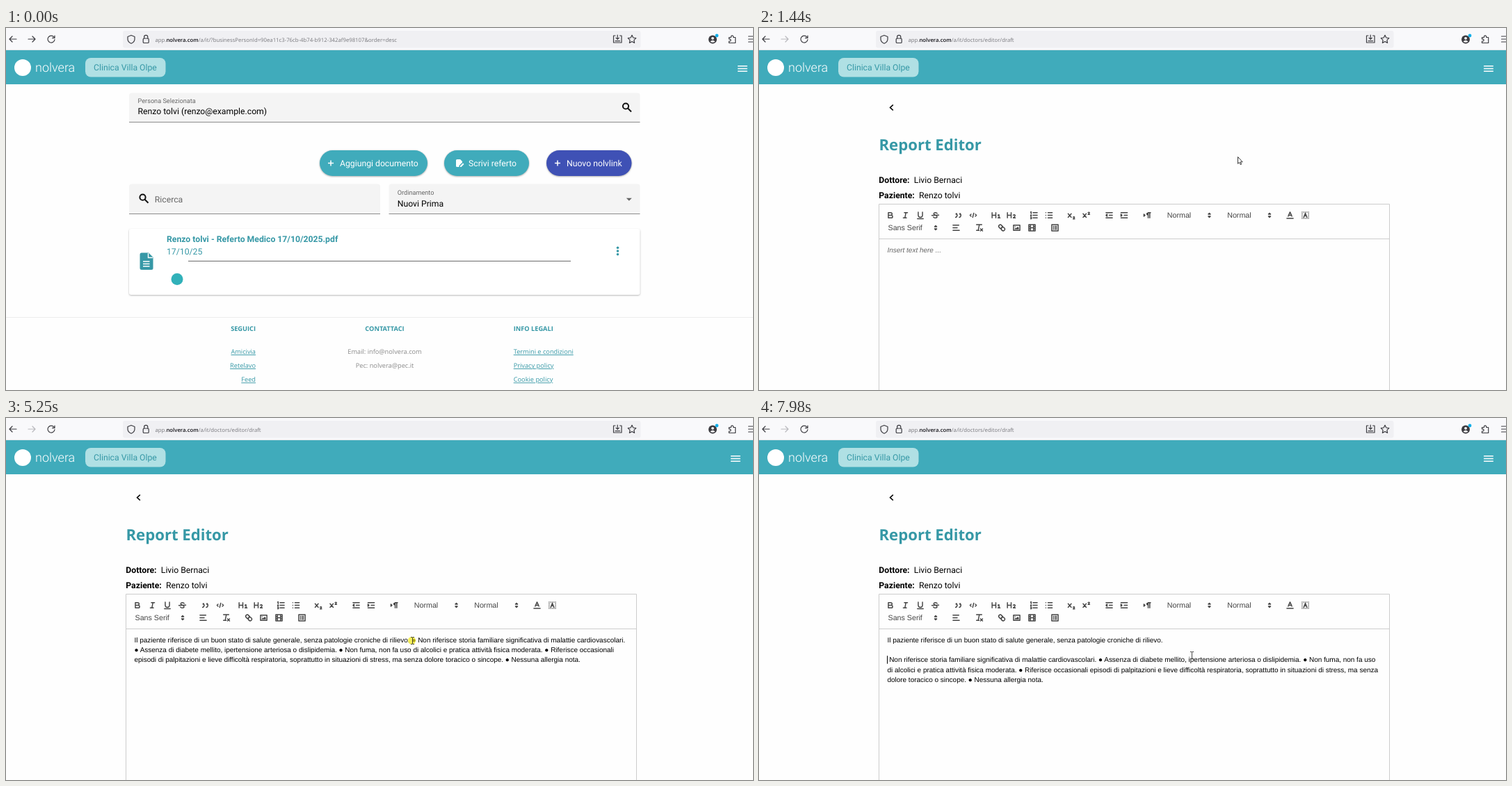
These frames come from a looping animation (1074x521 px, 8 s). An HTML page:

```html
<!DOCTYPE html>
<html lang="it">
<head>
<meta charset="utf-8">
<title>Report Editor</title>
<style>
html, body { margin: 0; width: 100%; height: 100%; overflow: hidden; background: #fefefe; }
svg { display: block; width: 100vw; height: 100vh; }
text { font: 12.23px Roboto, sans-serif; white-space: pre; text-rendering: geometricPrecision; }
.line { fill: none; stroke: #3b3b40; stroke-width: 1.2; stroke-linecap: round; stroke-linejoin: round; }
.url { font: 7.77px "Open Sans", sans-serif; fill: #77777c; }
.host { fill: #15141a; font-weight: 600; }
.label { font-size: 9.17px; fill: #666; }
.teal { fill: #3698a6; }
.white { fill: #fff; }
.bold { font-weight: 700; }
.field { fill: #f4f4f4; }
.rule { stroke: #8c8c8c; }
.find { fill: none; stroke: #111; stroke-width: 2; }
.foot text { font: 9.22px "Open Sans", sans-serif; fill: #3698a6; }
.foot .bold { font-weight: 700; }
.foot .link { text-decoration: underline; }
.foot .grey { fill: #8a8a8a; }
.end { text-anchor: end; }
.mid { text-anchor: middle; }
.raised { filter: drop-shadow(0 1.2px .8px rgba(0,0,0,.25)) drop-shadow(0 .6px 1.2px rgba(0,0,0,.12)); }
.raised.up { filter: drop-shadow(0 2.5px 2px rgba(0,0,0,.35)) drop-shadow(0 1px 2.5px rgba(0,0,0,.15)); }
.card { filter: drop-shadow(0 1px .8px rgba(0,0,0,.28)); }
.title { font: 700 22.15px "Open Sans", sans-serif; fill: #3698a6; }
.pick { font: 10.7px "Liberation Sans", Arial, sans-serif; fill: #444; }
.body { font: 9.97px "Liberation Sans", Arial, sans-serif; }
.hint { font-style: italic; fill: #666; }
.icon { fill: none; stroke: #444; stroke-width: 1.9; stroke-linecap: round; stroke-linejoin: round; }
</style>
</head>
<body>
<svg id="stage" viewBox="0 0 1074 521">
  <defs>
    <clipPath id="pill"><rect x="630" y="176" width="122" height="37" rx="18.5"/></clipPath>
  </defs>
  <rect width="1074" height="521" fill="#fefefe"/>

  <!-- browser bar -->
  <rect width="1074" height="32" fill="#f9f9fb"/>
  <rect y="31" width="1074" height="1" fill="#e2e8ea"/>
  <rect x="168" y="4" width="744.5" height="24.5" rx="3" fill="#f0f0f3"/>
  <g class="line">
    <path d="M15 16H5M9 12l-4 4 4 4"/>
    <path id="forward" d="M32 16H42M38 12l4 4-4 4"/>
    <path d="M69 13A5 5 0 1 0 70 16.5M70 11v3.3h-3.5"/>
    <path d="M180 10.5l5 2v3.5c0 3-2 5-5 6.3c-3-1.3-5-3.3-5-6.3v-3.5z"/>
    <rect x="197.2" y="15" width="8" height="6.5" rx="1.3"/>
    <path d="M198.6 15v-2a2.6 2.6 0 0 1 5.2 0v2"/>
    <path d="M876 11h-2.5v10h11.5v-10h-2.5M879.2 10v6M877 14.2l2.2 2.2 2.2-2.2M876 18.7h6.5"/>
    <path d="M900 10.3l1.8 3.7 4 .6-2.9 2.8.7 4-3.6-1.9-3.6 1.9.7-4-2.9-2.8 4-.6z"/>
    <path d="M1039.5 13.5h3v-1a1.6 1.6 0 0 1 3.2 0v1h3v8h-9.2v-2.5h1a1.6 1.6 0 0 0 0-3.2h-1z"/>
    <path d="M1067.5 12h9M1067.5 16h9M1067.5 20h9"/>
  </g>
  <circle cx="1016" cy="16.5" r="6" fill="#3b3b40"/>
  <circle cx="1016" cy="14.8" r="1.9" class="white"/>
  <path d="M1012.5 19.5q3.5-3.5 7 0q-3.5 2.5-7 0z" class="white"/>
  <circle cx="1022" cy="11" r="2.4" fill="#12aee8"/>
  <text class="url" x="214.5" y="19.6">app.<tspan class="host">nolvera.com</tspan><tspan id="path"></tspan></text>

  <!-- site header -->
  <rect y="32" width="1074" height="49" fill="#40abbb"/>
  <circle cx="24" cy="57" r="12" class="white"/>
  <text x="42" y="63" class="white" style="font-size:18px;font-weight:300">nolvera</text>
  <rect x="114" y="43" width="115.5" height="27.5" rx="8" fill="#b0e0e4"/>
  <text x="126" y="61.3" class="teal">Clinica Villa Olpe</text>
  <path id="menu" d="M1052 54.7h13.8M1052 58.5h13.8M1052 62.3h13.8" stroke="#fff" stroke-width="1.6"/>

  <!-- document list -->
  <g id="list">
    <path class="field" d="M177 135V97q0-3.5 3.5-3.5H908q3.5 0 3.5 3.5v38z"/>
    <path class="rule" d="M177 135.5H911.5"/>
    <text x="189.5" y="108.3" class="label">Persona Selezionata</text>
    <text x="189.5" y="123.8">Renzo tolvi (renzo@example.com)</text>
    <g class="find"><circle cx="891" cy="112.5" r="4.1"/><path d="M894 115.5l5 5"/></g>

    <rect class="raised" x="451" y="176" width="155" height="37" rx="18.5" fill="#40abbb"/>
    <path d="M463 194.5h8M467 190.5v8" stroke="#fff" stroke-width="1.5"/>
    <text x="480" y="199" class="white">Aggiungi documento</text>
    <rect id="write" class="raised" x="630" y="176" width="122" height="37" rx="18.5" fill="#40abbb"/>
    <g clip-path="url(#pill)">
      <rect id="glow" x="630" y="176" width="122" height="37" fill="#fff" opacity=".08"/>
      <circle id="ripple" cx="689" cy="187" fill="#fff" opacity=".13"/>
    </g>
    <path d="M648.5 189h4.5l3 3v1.5l-4.5 4.5v2h-3q-1.5 0-1.5-1.5v-8q0-1.5 1.5-1.5zM653 198.5l4-4 1.5 1.5-4 4H653z" class="white"/>
    <text x="665" y="199" class="white">Scrivi referto</text>
    <rect class="raised" x="777" y="176" width="122.5" height="37" rx="18.5" fill="#3f51b5"/>
    <path d="M789 194.5h8M793 190.5v8" stroke="#fff" stroke-width="1.5"/>
    <text x="806" y="199" class="white">Nuovo nolvlink</text>

    <path class="field" d="M177 267V228q0-3.5 3.5-3.5H534.5q3.5 0 3.5 3.5v39z"/>
    <path id="order" class="field" d="M550.5 267V228q0-3.5 3.5-3.5H908q3.5 0 3.5 3.5v39z"/>
    <path class="rule" d="M177 267.5H538M550.5 267.5H911.5"/>
    <g class="find"><circle cx="196.5" cy="243.7" r="4.1"/><path d="M199.5 246.7l5 5"/></g>
    <text x="213.8" y="250.9" fill="#666">Ricerca</text>
    <text x="562.7" y="240" class="label">Ordinamento</text>
    <text x="562.7" y="256.8">Nuovi Prima</text>
    <path d="M891.8 244.8h8l-4 4z" fill="#666"/>

    <rect class="card white" x="177" y="289" width="734.5" height="95" rx="3"/>
    <path class="teal" d="M195 323.5h10l6.5 6.5v15.5a2.5 2.5 0 0 1-2.5 2.5h-14a2.5 2.5 0 0 1-2.5-2.5v-19.5a2.5 2.5 0 0 1 2.5-2.5z"/>
    <path d="M204.5 324v6.5h6.5M197 336h9.5M197 339.5h9.5M197 343h9.5" fill="none" stroke="#fff" stroke-width="1.4"/>
    <text x="231" y="308.2" class="teal bold">Renzo tolvi - Referto Medico 17/10/2025.pdf</text>
    <text x="231" y="326" class="teal">17/10/25</text>
    <path d="M262 335.5H812" stroke="#6c6c6c"/>
    <circle cx="246" cy="361.5" r="8.5" fill="#31b1b9"/>
    <g class="teal"><circle cx="879.5" cy="316.3" r="1.8"/><circle cx="879.5" cy="321" r="1.8"/><circle cx="879.5" cy="325.7" r="1.8"/></g>

    <path d="M0 416.5H1074" stroke="#ececec"/>
    <g class="foot">
      <text x="359" y="435.6" class="bold end">SEGUICI</text>
      <text x="359" y="469" class="link end">Amicivia</text>
      <text x="359" y="489" class="link end">Retelavo</text>
      <text x="359" y="509.3" class="link end">Feed</text>
      <text x="544.5" y="435.6" class="bold mid">CONTATTACI</text>
      <text x="544.5" y="469" class="grey mid">Email: info@nolvera.com</text>
      <text x="544.5" y="489" class="grey mid">Pec: nolvera@pec.it</text>
      <text x="729.7" y="435.6" class="bold">INFO LEGALI</text>
      <text x="729.7" y="469" class="link">Termini e condizioni</text>
      <text x="729.7" y="489" class="link">Privacy policy</text>
      <text x="729.7" y="509.3" class="link">Cookie policy</text>
    </g>
  </g>

  <!-- report editor -->
  <g id="editor">
    <path d="M192.8 110.5l-4.2 4 4.2 4" fill="none" stroke="#000" stroke-width="1.7"/>
    <text x="172.5" y="176" class="title">Report Editor</text>
    <text x="172.3" y="223.4" class="bold">Dottore:</text><text x="222.8" y="223.4">Livio Bernaci</text>
    <text x="172.3" y="244.5" class="bold">Paziente:</text><text x="230" y="244.5">Renzo tolvi</text>
    <path d="M172.5 530V253.5H906.5V530M172.5 303.5H906.5" fill="none" stroke="#ccc"/>
    <text x="586.8" y="273.3" class="pick">Normal</text>
    <text x="673.2" y="273.3" class="pick">Normal</text>
    <text x="185.5" y="291.3" class="pick">Sans Serif</text>
    <g id="tools"></g>
    <g id="lines"></g>
    <circle id="click" cx="583.5" cy="320.3" r="5.6" fill="#f3ea1e" opacity=".72"/>
    <rect id="caret" width="1" height="11.5"/>
  </g>

  <g id="cursor">
    <path id="arrow" d="M0 0v9.8l2.2-2 1.5 3.3 1.5-.6-1.5-3.2h3z" fill="#fff" stroke="#222" stroke-width=".9"/>
    <path id="hand" d="M-1.1 7V1.1a1.1 1.1 0 0 1 2.2 0v3.9l3 .7q1.4.4 1.2 2l-.5 3.3-1 2.5h-4.6l-3-4.4q-.7-1.4.5-1.7z" fill="#fff" stroke="#222" stroke-width=".9"/>
    <path id="beam" d="M-2.5-5h2l.5.5.5-.5h2M0-4.5v9M-2.5 5h2l.5-.5.5.5h2" fill="none" stroke="#333" stroke-width=".9"/>
  </g>
</svg>
<script>
const $ = id => document.getElementById(id);
const show = (id, on) => $(id).setAttribute('display', on ? 'inline' : 'none');
const within = (t, a, b) => t >= a && t < b;
const latest = (rows, t) => rows.filter(r => t >= r[0]).pop() || rows[0];

// Toolbar glyphs on an 18-unit grid: [centre x, centre y, path, solid path]
const UPDOWN = 'M7 11l2 2 2-2zM7 7l2-2 2 2z';
const TWO = 'q1.5-1.5 2.6 0q.4 1-2.6 3.5h3';
const tools = [
  [189, 269.5, 'M5 4h4.5a2.5 2.5 0 0 1 0 5H5zM5 9h5.5a2.5 2.5 0 0 1 0 5H5z'],
  [210.5, 269.5, 'M7 4h6M5 14h6M8 14l2-10'],
  [232, 269.5, 'M5 3v6a4 4 0 0 0 8 0V3M3.5 15.5h11'],
  [253.5, 269.5, 'M12.5 5.5C11 3.3 6 3.5 6 6.3c0 2.8 6.3 2.2 6.3 5.3c0 3-5 3.2-6.8.8M2.5 9.3l13-.6'],
  [286.5, 269.5, 'M7 8c0 4-3 5-3 5M14 8c0 4-3 5-3 5', 'M4 5h3v3H4zM11 5h3v3h-3z'],
  [308, 269.5, 'M5 7L3 9l2 2M13 7l2 2-2 2M10 5L8 13'],
  [340.5, 269.5, 'M2 4v10M9 4v10M2 9h7M13 9l2-1v6M13 14h4'],
  [362.5, 269.5, 'M2 4v10M9 4v10M2 9h7M13 9q2-2 3.5 0q.4 1.5-3.5 5h4'],
  [395.5, 269.5, 'M7 4h8M7 9h8M7 14h8M2.5 3l1-.5V6M2.5 8.5h1.5l-1.5 2h1.5M2.5 13h1.5v2.5H2.5'],
  [417, 269.5, 'M7 4h8M7 9h8M7 14h8M3 4h0M3 9h0M3 14h0'],
  [449, 269.5, 'M3 6l6 7M9 6l-6 7M12.5 12.5' + TWO],
  [470.5, 269.5, 'M3 6l6 7M9 6l-6 7M12.5 4' + TWO],
  [503.5, 269.5, 'M3 14h12M3 4h12M9 9h6M5 7v4L3 9z'],
  [525, 269.5, 'M3 14h12M3 4h12M9 9h6M3 7v4l2-2z'],
  [558, 269.5, 'M3 7v4l2-2zM15.5 4H11M11 4v10M14 4v10', 'M11 9H10a2.5 2.5 0 0 1 0-5h1z'],
  [647.5, 269.5, UPDOWN], [734, 269.5, UPDOWN],
  [763.5, 269.5, 'M3 15h12M5.5 11L9 3l3.5 8M11.6 9H6.4'],
  [785.5, 269.5, 'M6 13l3-8 3 8M11 10H7M3 3h0M6 3h0M9 3h0M12 3h0M15 3h0M3 6h0M15 6h0M3 9h0M15 9h0M3 12h0M15 12h0M3 15h0M6 15h0M9 15h0M12 15h0M15 15h0'],
  [254, 287.5, UPDOWN],
  [283.5, 287.5, 'M3 4h11M3 9h8M3 14h12'],
  [316.5, 287.5, 'M4 3h10M9.5 3L7.5 12M4 14h5M11.5 11l4 4M15.5 11l-4 4'],
  [349, 287.5, 'M7 11l4-4M8.9 4.6a3.5 3.5 0 0 1 .4 4.7a3.5 3.5 0 0 1-4.7-.4c-1.4-1.4-2.5-2.5-.4-4.7s3.3-1 4.7.4zM13.4 9.1a3.5 3.5 0 0 0-4.7-.4a3.5 3.5 0 0 0 .4 4.7c1.4 1.4 2.5 2.5 4.7.4s1-3.3-.4-4.7z'],
  [370.5, 287.5, 'M3 4h12v10H3zM6 7h0', 'M5 12v-1l2-2 1 1 3-3 2 2v3z'],
  [392.5, 287.5, 'M3 3h12v12H3zM6 3v12M12 3v12M6 9h6M3 7h3M3 11h3M12 7h3M12 11h3'],
  [425.5, 287.5, 'M3 3h12v12H3zM6 6.5h1M9.5 6.5H12M6 9h1M9.5 9H12M6 11.5h1M9.5 11.5H12']
];
$('tools').innerHTML = tools.map(([x, y, d, solid]) =>
  `<g transform="translate(${x - 6.88} ${y - 6.88}) scale(.7645)"><path class="icon" d="${d}"/>` +
  (solid ? `<path fill="#444" d="${solid}"/>` : '') + '</g>').join('');

// Report text, cut where the lines may break
const intro = 'Il paziente riferisce di un buon stato di salute generale, senza patologie croniche di rilievo.';
const family = ' Non riferisce storia familiare significativa di malattie cardiovascolari.';
const illness = '● Assenza di diabete mellito, ipertensione arteriosa o dislipidemia.';
const habits = '● Non fuma, non fa uso';
const sport = 'di alcolici e pratica attività fisica moderata.';
const reports = '● Riferisce occasionali';
const episodes = 'episodi di palpitazioni e lieve difficoltà respiratoria, soprattutto in situazioni di stress, ma senza';
const ending = 'dolore toracico o sincope. ● Nessuna allergia nota.';
const tail = [[sport, reports, episodes].join(' '), ending];
const second = [family, illness, habits].join(' ');
const texts = [
  [1370, ['Insert text here ...']],
  [3390, [`${intro} ●${family}`, [illness, habits, sport, reports].join(' '), `${episodes} ${ending}`]],
  [6120, [intro, '●' + second, ...tail]],
  [6650, [intro, second, ...tail]],
  [7980, [intro, '', second, ...tail]]
];
const LEADING = 14.1;
let shown = null;
function setText(t) {
  const now = latest(texts, t);
  if (now === shown) return;
  shown = now;
  const look = now === texts[0] ? 'body hint' : 'body';
  $('lines').innerHTML = now[1].map((s, i) =>
    `<text class="${look}" x="184.4" y="${323.2 + i * LEADING}">${s}</text>`).join('');
}

// Caret: from, to, x, line
const carets = [
  [2330, 2860, 184, 0], [3390, 3940, 824, 2], [4470, 5000, 824, 2], [5380, 5920, 582, 0],
  [6120, 7180, 184, 1], [7710, 7980, 184, 1], [7980, 8000, 184, 2]
];

// Pointer moves: start, steps, from, bend, to
const moves = [
  [190, 12, [983, 494], [850, 300], [688.5, 185.5]],
  [1710, 10, [688.5, 185.5], [530, 280], [371.5, 375.5]],
  [3940, 11, [371.5, 375.5], [430, 415], [612.5, 335.5]],
  [4770, 7, [612.5, 335.5], [598, 328], [584.5, 320.5]],
  [5380, 3, [584.5, 320.5], [604, 331], [622.5, 341.5]]
];
const STEP = 69;
const ease = p => p * p * (3 - 2 * p);
function pointer(t) {
  const [start, steps, a, b, c] = latest(moves, t);
  const step = Math.max(0, Math.floor((t - start) / STEP) + 1);
  const p = ease(Math.min(1, step / steps)), q = 1 - p;
  return a.map((v, i) => q * q * v + 2 * q * p * b[i] + p * p * c[i]);
}

function draw(t) {
  const list = t < 1370;
  show('list', list);
  show('editor', !list);
  $('path').textContent = list
    ? '/a/it/?businessPersonId=90ea11c3-76cb-4b74-b912-342af9e98107&order=desc'
    : '/a/it/doctors/editor/draft';
  $('forward').style.stroke = list ? '#3b3b40' : '#b9b9bd';
  $('menu').setAttribute('transform', `translate(${list ? 0 : -10} 0)`);

  const [x, y] = pointer(t);
  const active = within(t, 190, 3390) || t >= 3940;
  const onWrite = list && active && within(y, 176, 213) && within(x, 630, 752);
  const onOrder = list && active && within(y, 224, 268) && within(x, 550, 912);
  const inText = !list && y > 303;
  show('cursor', active);
  $('cursor').setAttribute('transform', `translate(${x} ${y})`);
  show('hand', onWrite || onOrder);
  show('beam', inText);
  show('arrow', !onWrite && !onOrder && !inText);

  $('write').classList.toggle('up', onWrite);
  show('glow', onWrite);
  $('ripple').setAttribute('r', Math.max(0, Math.min(1, (t - 1000) / 240)) * 75);
  $('order').style.fill = onOrder ? '#ececec' : '#f4f4f4';

  setText(t);
  show('click', within(t, 5250, 5450));
  const caret = carets.find(c => within(t, c[0], c[1]));
  show('caret', caret);
  if (caret) {
    $('caret').setAttribute('x', caret[2]);
    $('caret').setAttribute('y', 314 + caret[3] * LEADING);
  }
}

const begin = performance.now();
function tick() {
  draw((performance.now() - begin) % 8000);
  requestAnimationFrame(tick);
}
tick();
</script>
</body>
</html>
```
